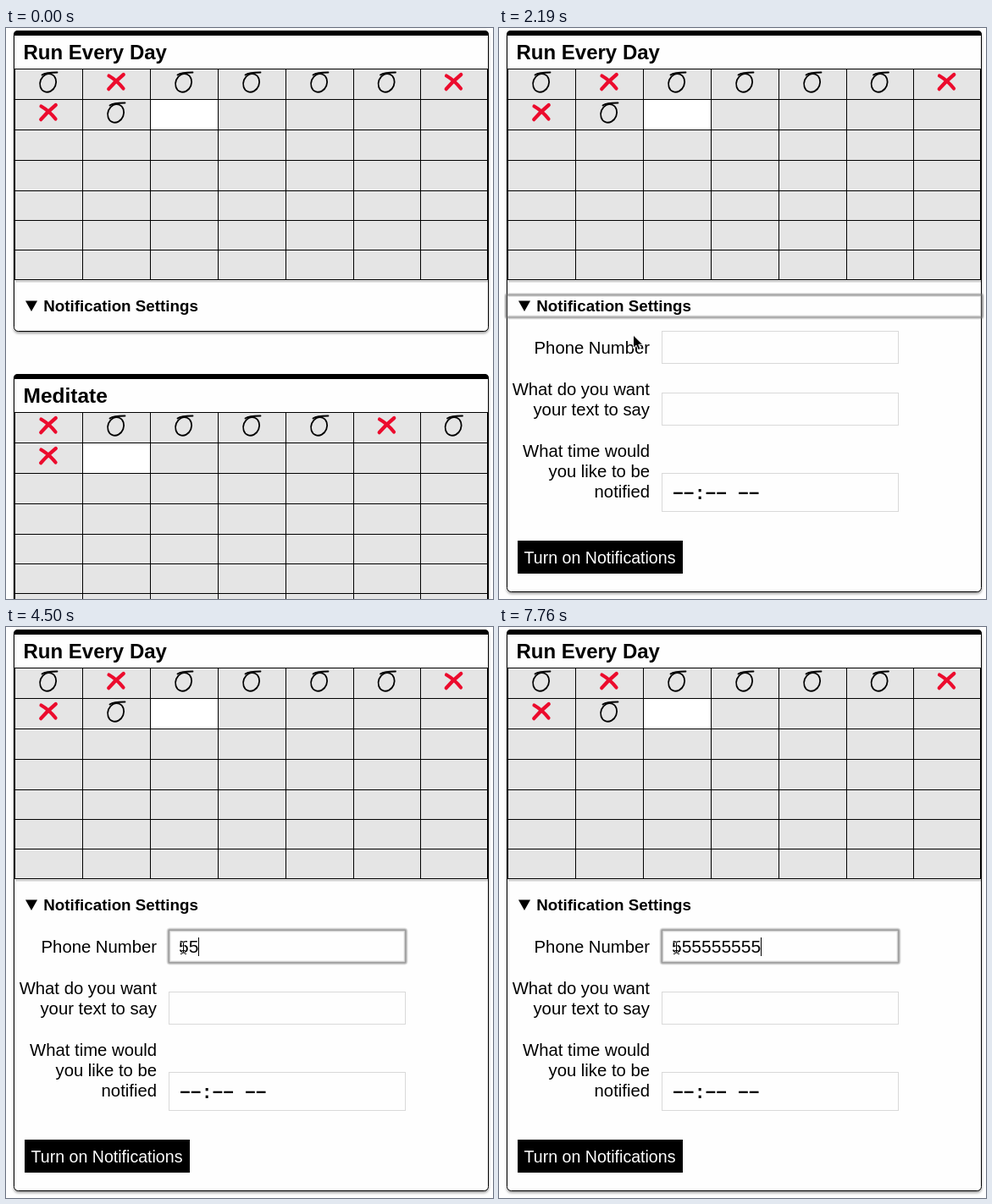
These frames come from a looping animation (575x675 px, 8000 ms). An HTML page:

```html
<!DOCTYPE html>
<html lang="en">
<head>
<meta charset="utf-8">
<title>Habit tracker</title>
<style>
  html, body { margin: 0; height: 100%; overflow: hidden; background: #fefefe; }
  svg { display: block; width: 575px; height: 675px; font: 20.3px "Liberation Sans", Arial, sans-serif; }
  .bold { font-weight: bold; }
  .labels { text-anchor: end; }
  .card { fill: #fefefe; stroke: #000; filter: drop-shadow(0 2px 1.5px rgba(0,0,0,.38)); }
  .field { fill: #fefefe; stroke: #d9d9d9; }
  .ring rect { fill: none; stroke: #777; }
  .line { fill: none; stroke: #000; }
</style>
</head>
<body>
<svg viewBox="0 0 575 675">
  <defs>
    <g id="miss" fill="none" stroke="#ec0b2d" stroke-width="4.2" stroke-linecap="round">
      <path d="M-8.5-7.5Q1-2 8.5 7.5M8.8-9Q-1-1-8.8 8.2"/>
    </g>
    <g id="done" class="line" stroke-width="1.8" stroke-linecap="round">
      <ellipse cy="1" rx="9.3" ry="11" transform="rotate(22)"/>
      <path d="M-7.5-8.5Q-3-11.500 10.5-11.500"/>
    </g>
  </defs>
  <g id="meditate"></g>
  <g id="run"></g>
  <path d="M23 322.500h14l-7 12.500z"/>
  <text class="bold" x="44.300" y="335" font-size="18.8">Notification Settings</text>
  <g id="settings">
    <g class="labels">
      <text x="178" y="385">Phone Number</text>
      <text x="178" y="434">What do you want</text>
      <text x="178" y="458">your text to say</text>
      <text x="178" y="507">What time would</text>
      <text x="178" y="531">you like to be</text>
      <text x="178" y="555">notified</text>
    </g>
    <rect class="field" x="192.500" y="358.500" width="279" height="38"/>
    <rect class="field" x="192.500" y="431.500" width="279" height="38"/>
    <rect class="field" x="192.500" y="526.500" width="279" height="45"/>
    <text class="bold" x="205" y="557" font-size="21.400" font-family="Liberation Mono, monospace" xml:space="preserve">−−:−− −−</text>
    <rect x="22" y="606" width="195" height="39"/>
    <text x="29.500" y="633" font-size="19.6" fill="#fff">Turn on Notifications</text>
  </g>
  <g id="summaryRing" class="ring"></g>
  <g id="phoneRing" class="ring"></g>
  <text id="digits" x="204" y="385" font-size="21"></text>
  <rect id="caret" y="367" width="1" height="22"/>
  <g id="beam" class="line">
    <path id="beamShape" d="M-3.500-7.500Q-.500-7.500 0-5.500Q.500-7.500 3.500-7.500M0-5.500V5.500M-3.500 7.500Q-.500 7.500 0 5.500Q.500 7.500 3.500 7.500M-2 3.500H2"/>
  </g>
  <path id="arrow" d="M0 0V15.500L3.600 12.200L6 17.600L8.700 16.400L6.300 11.200H11.300Z" stroke="#fff" stroke-width="1"/>
</svg>
<script>
const $ = id => document.getElementById(id);
const show = (id, on) => $(id).setAttribute("visibility", on ? "visible" : "hidden");

const COLS = [10, 90, 170, 250, 330, 410, 489, 568];
const ROWS = [45, 81, 117, 153, 189, 224, 259, 294];

// marks: "o" = done, "x" = missed; the next cell is today
function card(title, top, height, marks, size) {
  const today = marks.length;
  const cellX = i => COLS[i % 7], cellY = i => ROWS[Math.floor(i / 7)];
  const lines = COLS.map(x => `M${x + .5} 45V295`).join("") + ROWS.map(y => `M10 ${y + .5}H569`).join("");
  const icons = [...marks].map((m, i) =>
    `<use href="#${m === "o" ? "done" : "miss"}" x="${(cellX(i) + COLS[i % 7 + 1]) / 2}" y="${cellY(i) + 16}"/>`).join("");
  return `<g transform="translate(0 ${top})">
    <rect class="card" x="9.5" y=".5" width="560" height="${height}" rx="5"/>
    <path d="M9 6V5Q9 0 14 0H565Q570 0 570 5V6Z"/>
    <text class="bold" x="20.5" y="34" font-size="${size}">${title}</text>
    <path d="M11 296.5H569" stroke="#ccc" stroke-width="2"/>
    <rect x="10" y="45" width="559" height="250" fill="#e5e5e5"/>
    <rect x="${cellX(today)}" y="${cellY(today)}" width="80" height="36" fill="#fff"/>
    <path class="line" d="${lines}"/>${icons}</g>`;
}

const ring = (x, y, w, h) => [[5, .18], [3, .35], [1.5, .3]].map(([width, alpha]) =>
  `<rect x="${x}" y="${y}" width="${w}" height="${h}" rx="1.5" stroke-width="${width}" stroke-opacity="${alpha}"/>`).join("");

$("meditate").innerHTML = card("Meditate", 409, 355, "xoooxox".replace("xoooxox", "xooooxo") + "x", 24.5);
$("summaryRing").innerHTML = ring(8.5, 315.5, 562, 26.5);
$("phoneRing").innerHTML = ring(192, 358, 280, 39);

// white halo under the text cursor
const halo = $("beamShape").cloneNode();
halo.removeAttribute("id");
halo.setAttribute("stroke", "#fff");
halo.setAttribute("stroke-width", 2.5);
halo.setAttribute("stroke-opacity", .6);
$("beam").prepend(halo);

const LOOP = 8000, OPEN = 1390, FOCUS = 3140, STEP = 200 / 3;
const PHONE = "555555555";
const KEYS = [4140, 4500, 4860, 5690, 5980, 6400, 7050, 7410, 7760];
const CARET_OFF = [[3610, 4080], [5390, 5690], [6870, 7050]];

// the pointer moves in short discrete steps that slow down
function glide(t, start, steps, power, from, to) {
  const u = Math.min(1, (Math.floor((t - start + 4) / STEP) + 1) / steps);
  const eased = 1 - (1 - u) ** power;
  return from.map((v, i) => v + (to[i] - v) * eased);
}

function pointer(t) {
  return t < 1990
    ? glide(t, 600, 4, 2, [-25, 329], [67.5, 334.5])
    : glide(t, 1990, 11, 2.27, [67.5, 334.5], [209.5, 379]);
}

let wasOpen = null;
function draw(t) {
  const open = t >= OPEN, focused = t >= FOCUS;
  if (open !== wasOpen) {
    $("run").innerHTML = card("Run Every Day", 3, open ? 663 : 355, "oxooooxxo", 24);
    wasOpen = open;
  }
  show("meditate", !open);
  show("settings", open);
  show("summaryRing", t >= 1220 && !focused);
  show("phoneRing", focused);

  const typed = KEYS.filter(k => t >= k).length;
  $("digits").textContent = PHONE.slice(0, typed);
  $("caret").setAttribute("x", Math.round(204 + 11.68 * typed));
  show("caret", focused && !CARET_OFF.some(([a, b]) => t >= a && t < b));

  const [x, y] = pointer(t);
  const isArrow = y > 343 && x < 192;
  const place = `translate(${Math.round(x * 2) / 2} ${Math.round(y * 2) / 2})`;
  $("beam").setAttribute("transform", place);
  $("arrow").setAttribute("transform", place);
  show("beam", t >= 600 && !isArrow);
  show("arrow", t >= 600 && isArrow);
}

function tick() {
  draw(performance.now() % LOOP);
  requestAnimationFrame(tick);
}
tick();
</script>
</body>
</html>
```
